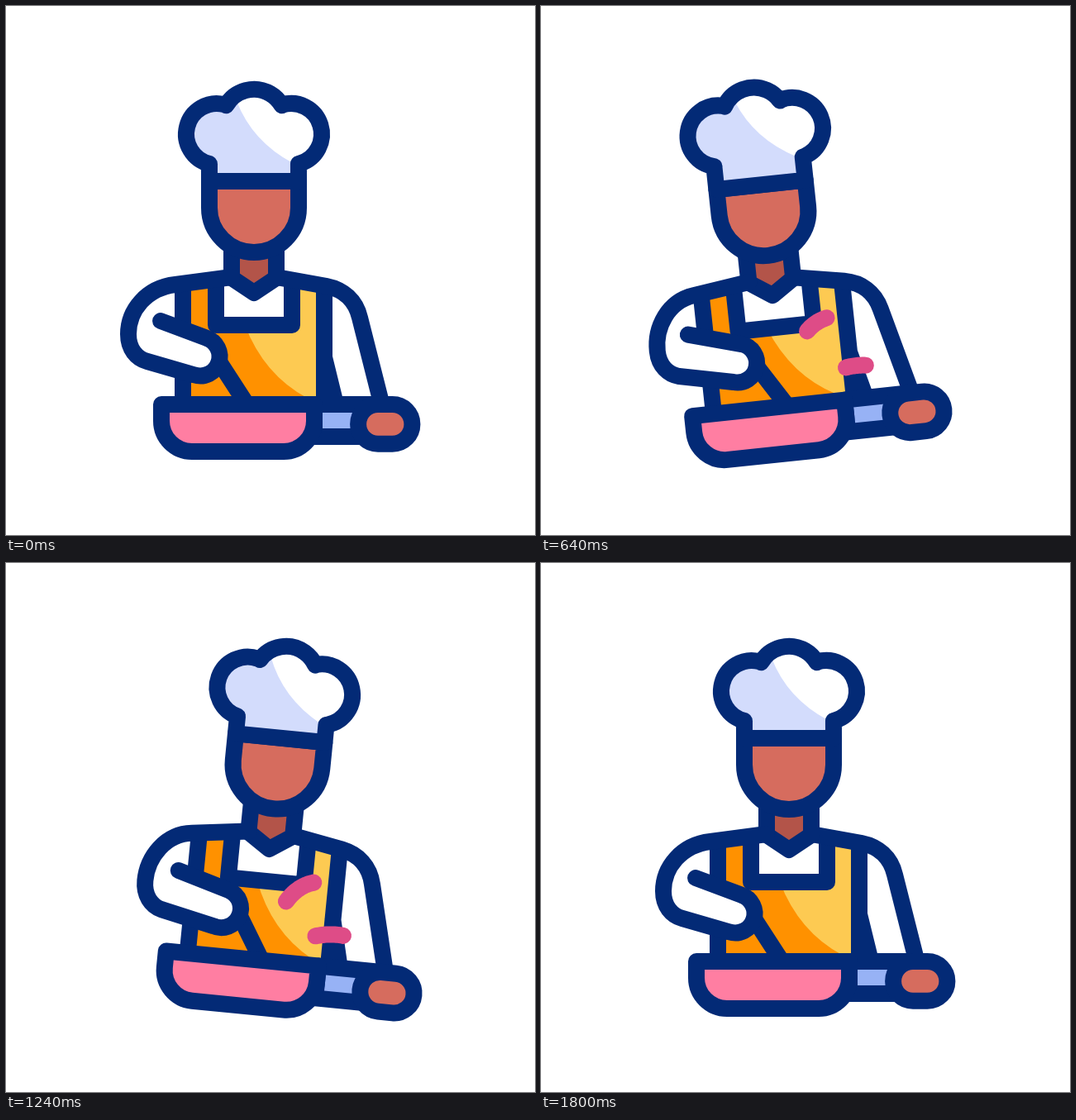
These frames come from a looping animation (640 by 640 pixels, 1.84 s). An HTML page with a canvas:

```html
<!DOCTYPE html>
<html lang="en">
<head>
<meta charset="utf-8">
<title>Cooking chef</title>
<style>
  html, body { margin: 0; width: 100%; height: 100%; overflow: hidden; background: #fff; }
  canvas { display: block; width: 100vw; height: 100vh; }
</style>
</head>
<body>
<canvas id="stage" width="640" height="640"></canvas>
<script>
const ctx = document.getElementById('stage').getContext('2d');
const LOOP = 1840, STEP = 40, DEG = Math.PI / 180;
const PIVOT = [319, 535];
const NAVY = '#032a76', WHITE = '#fff', LAVENDER = '#d3dcfc', SKIN = '#d66c5e',
  NECK = '#b35449', ORANGE = '#ff9100', YELLOW = '#fdca52', PINK = '#ff7ea2',
  BLUE = '#97b2f5', FOOD = '#de4c87';

// Keyframes: [time in ms, value]
const TILT = [[60, 0], [670, -6.1], [1120, 6.1], [1780, 0]];
const HEAD = [[80, 0], [400, 11.5], [880, -10.5], [1240, 0]];
const PUFF = [[400, 0], [880, -14], [1200, 0]];
const STIR = [[120, 0], [540, 1], [900, 0], [1360, 1], [1780, 0]];

const TOSSES = [420, 1060], TOSS_TIME = 360;
const ARCS = [
  [[315, 437], [328, 388], [362, 381]],
  [[346, 455], [375, 439], [403, 443]]
];

const clamp = x => Math.min(1, Math.max(0, x));
const ease = x => (1 - Math.cos(Math.PI * clamp(x))) / 2;

function track(keys, t) {
  let i = 0;
  while (i < keys.length - 2 && t > keys[i + 1][0]) i++;
  const [t0, v0] = keys[i], [t1, v1] = keys[i + 1];
  return v0 + (v1 - v0) * ease((t - t0) / (t1 - t0));
}

function paint(path, fill, stroke) {
  if (fill) {
    ctx.fillStyle = fill;
    ctx.fill(path);
  }
  if (stroke) {
    ctx.strokeStyle = stroke;
    ctx.stroke(path);
  }
}

const shape = (d, fill, stroke) => paint(new Path2D(d), fill, stroke);

function body() {
  shape('M214 336 L254 331 V386 H346 V332 L385 339 V482 H214 Z', YELLOW);
  shape('M214 336 L254 331 V386 H289 Q312 446 364 474 V482 H214 Z', ORANGE);
  shape('M214 338 V480 M254 333 V386 H346 V333 M385 340 V480 M385 425 L398 478', null, NAVY);
  shape('M327 328 L388 339 C408 343 423 356 428 377 L453 476', null, NAVY);
  shape('M273 265 V329 L300 347 L327 329 V265 Z', NECK);
  shape('M273 265 V329 L300 347 L327 329 V265', null, NAVY);
}

function hat(puff) {
  const p = new Path2D();
  p.moveTo(246, 212);
  p.lineTo(246, 191 + puff);
  p.arc(255, 155 + puff, 37, 104 * DEG, 287.5 * DEG);
  p.arc(300, 139.7 + puff, 38.9, 210 * DEG, 330 * DEG);
  p.arc(345, 155 + puff, 37, 252.5 * DEG, 436 * DEG);
  p.lineTo(354, 212);
  p.closePath();
  paint(p, WHITE);
  ctx.save();
  ctx.clip(p);
  ctx.translate(0, puff);
  shape('M274 100 L279 115 Q298 164 347 190 L360 196 V240 H200 V100 Z', LAVENDER);
  ctx.restore();
  paint(p, null, NAVY);
}

function head(y, puff) {
  ctx.save();
  ctx.translate(0, y);
  shape('M246 212 V244 A54 54 0 0 0 354 244 V212 Z', SKIN, NAVY);
  hat(puff);
  ctx.restore();
}

function arm(s) {
  const hx = 235 + 17 * s, hy = 424, ex = 7.5 * s, ey = 3 * s;

  ctx.beginPath();
  ctx.moveTo(hx + 20, hy + 2);
  ctx.lineTo(290 + 15 * s, 480);
  ctx.strokeStyle = NAVY;
  ctx.stroke();

  const elbow = p => {
    p.bezierCurveTo(148 + ex, 415 + ey, 158 + ex, 426.5 + ey, 171 + ex, 430 + ey);
    p.arc(hx, hy, 23.5, 1.89, -1.25, true);
    p.lineTo(187 + ex, 381 + ey);
  };
  const forearm = new Path2D();
  forearm.moveTo(148 + ex, 397 + ey);
  elbow(forearm);
  paint(forearm, WHITE);

  const sleeve = new Path2D();
  sleeve.moveTo(273, 328);
  sleeve.lineTo(205, 337);
  sleeve.bezierCurveTo(170 + ex / 2, 341, 148 + ex, 368 + ey, 148 + ex, 397 + ey);
  elbow(sleeve);
  paint(sleeve, null, NAVY);
}

function pan() {
  shape('M373 482 H452 V521 H373 Z', BLUE, NAVY);
  shape('M188 482 H373 V502 A37 37 0 0 1 336 539 H225 A37 37 0 0 1 188 502 Z', PINK, NAVY);
  shape('M450 482 H467.5 A23.9 23.9 0 0 1 467.5 529.8 H450 A23.9 23.9 0 0 1 450 482 Z', SKIN, NAVY);
}

function along([a, b, c], u) {
  const v = 1 - u;
  return [0, 1].map(k => v * v * a[k] + 2 * u * v * b[k] + u * u * c[k]);
}

function food(t) {
  for (const start of TOSSES) {
    const p = (t - start) / TOSS_TIME;
    if (p <= 0 || p >= 1) continue;
    const front = ease(p / 0.6), back = ease((p - 0.2) / 0.75);
    for (const arc of ARCS) {
      ctx.beginPath();
      for (let i = 0; i <= 16; i++) {
        ctx.lineTo(...along(arc, back + (front - back + 0.001) * i / 16));
      }
      ctx.strokeStyle = FOOD;
      ctx.stroke();
    }
  }
}

function draw(t) {
  const moving = t >= 120 && t < 1800;
  const time = moving ? t : 0;
  ctx.setTransform(1, 0, 0, 1, 0, 0);
  ctx.fillStyle = WHITE;
  ctx.fillRect(0, 0, 640, 640);
  ctx.lineWidth = 20;
  ctx.lineCap = ctx.lineJoin = 'round';
  ctx.translate(...PIVOT);
  ctx.rotate(track(TILT, time) * DEG);
  ctx.translate(-PIVOT[0], -PIVOT[1]);
  body();
  head(track(HEAD, time), track(PUFF, time));
  arm(track(STIR, time));
  pan();
  food(time);
}

const begin = performance.now();
function tick() {
  const t = (performance.now() - begin) % LOOP;
  draw(Math.floor(t / STEP) * STEP);
  requestAnimationFrame(tick);
}
tick();
</script>
</body>
</html>
```
